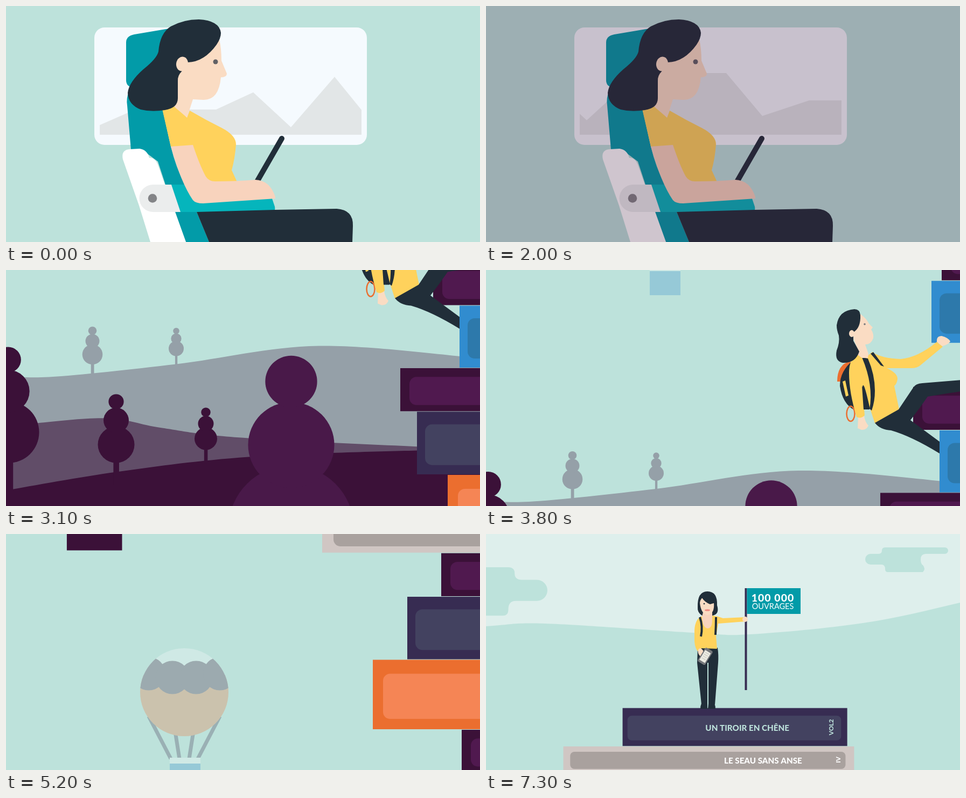
These frames come from a looping animation (880 px wide and 440 px high, 8000 ms). An HTML page with a canvas:

```html
<!DOCTYPE html>
<html lang="fr">
<head>
<meta charset="utf-8">
<style>
html, body { margin: 0; width: 100%; height: 100%; overflow: hidden; background: #bde2db; }
canvas { display: block; }
</style>
</head>
<body>
<canvas id="stage" width="880" height="440"></canvas>
<script>
const g = document.getElementById('stage').getContext('2d');
const LOOP = 8000, CLIMB = 2400, END = 7300;
const MINT = '#bde2db', PALE = '#deefec', NAVY = '#212e39', TEAL = '#029ba8', YELLOW = '#ffd25c',
  SKIN = '#fadcc3', ARM = '#f8d3bd', PLUM = '#3b1138', ORANGE = '#eb6e2f', GREY = '#95a0a8',
  INDIGO = '#372c52', WHITE = '#fff';

/* ---------- helpers ---------- */
function shape(color, d) { g.fillStyle = color; g.fill(new Path2D(d)); }
function line(color, width, d) {
  g.strokeStyle = color; g.lineWidth = width; g.stroke(new Path2D(d));
}
function rect(color, x, y, w, h, r = 0) {
  g.fillStyle = color; g.beginPath(); g.roundRect(x, y, w, h, r); g.fill();
}
function oval(color, x, y, rx, ry = rx, turn = 0) {
  g.fillStyle = color; g.beginPath(); g.ellipse(x, y, rx, ry, turn, 0, 7); g.fill();
}
function ring(color, width, x, y, rx, ry) {
  g.strokeStyle = color; g.lineWidth = width;
  g.beginPath(); g.ellipse(x, y, rx, ry, 0, 0, 7); g.stroke();
}
function text(s, x, y, size, color, weight = 800) {
  g.font = `${weight} ${size}px Lato, "Open Sans", sans-serif`;
  g.textAlign = 'center'; g.fillStyle = color; g.fillText(s, x, y);
}
function upright(s, x, y, size, color) {
  g.save(); g.translate(x, y); g.rotate(-Math.PI / 2);
  text(s, 0, size * .36, size, color); g.restore();
}
// smooth curve through a few points, filled to the given depth
function hill(color, depth, ...pts) {
  const last = pts.length - 1, at = i => pts[Math.max(0, Math.min(last, i))];
  g.beginPath(); g.moveTo(...pts[0]);
  for (let i = 0; i < last; i++) {
    const [a, b, c, d] = [at(i - 1), at(i), at(i + 1), at(i + 2)];
    g.bezierCurveTo(b[0] + (c[0] - a[0]) / 6, b[1] + (c[1] - a[1]) / 6,
      c[0] - (d[0] - b[0]) / 6, c[1] - (d[1] - b[1]) / 6, ...c);
  }
  g.lineTo(pts[last][0], depth); g.lineTo(pts[0][0], depth);
  g.fillStyle = color; g.fill();
}

/* ---------- train ---------- */
const RIDGE = 'M174,240V222L240,193H390L459,161L529,226L610,132L686,226L760,133L847,213L921,145'
  + 'L1057,125H1106L1173,205L1260,176H1500V240Z';

function train(t) {
  rect(MINT, 0, 0, 880, 440);
  rect('#f5fafe', 164, 40, 506, 219, 19);
  g.save();
  g.beginPath(); g.rect(174, 50, 486, 190); g.clip();
  g.translate(-.33 * t, 0);
  shape('#e2e6e7', RIDGE);
  g.restore();

  // seat
  shape(TEAL, 'M223,68Q223,56 238,53L303,42L320,150L235,152Q223,150 223,138Z');
  shape(TEAL, 'M228,160Q223,172 225,185L232,268L262,275L282,290L296,333L314,384L334,440H377L354,384L332,333Q315,300 306,262L290,190Z');
  shape(WHITE, 'M217,286Q213,268 230,267L248,266Q262,268 266,283Q277,283 282,296L295,333L314,384L334,440H268L247,372Z');
  shape('#05b5bc', 'M307,333H360L400,360L494,359L499,374Q501,384 494,384H324Z');
  shape('#ebeded', 'M273,333H307L324,384H273A25,25 0 0 1 273,333Z');
  oval('#838487', 272, 358.5, 8.3);

  // traveller
  shape(NAVY, 'M354,384L499,380L614,378Q645,380 644,410L643,440H377Z');
  shape(YELLOW, 'M290,192L310,182L336,208L341,195Q370,212 400,227Q427,241 427,258Q425,285 419,306L429,328H370L345,262H306Z');
  shape(SKIN, 'M396,62Q400,80 400,102L410,126Q410,133 399,133Q395,176 366,175L347,174L336,208L308,184L318,130L325,110L340,98Z');
  shape(NAVY, 'M283,85Q286,50 306,38Q330,25 358,25Q396,27 399,50Q399,60 391,72Q368,104 338,105L327,121Q318,130 319,140V172Q319,190 295,194Q270,198 250,193Q227,184 226,162Q228,142 255,118Q280,98 283,85Z');
  oval(SKIN, 327, 108, 11, 13.5, .15);
  oval('#616165', 389, 104, 4.5);
  g.lineCap = 'round';
  line(NAVY, 10, 'M512,247L465,329');
  g.lineCap = 'butt';
  shape(ARM, 'M306,262L347,259Q360,298 371,318Q377,327 388,327Q430,327 463,324Q490,325 500,356V359L366,368Q352,368 347,362Q325,330 306,262Z');
}

/* ---------- camera ---------- */
const stop = (t, k, x, y) => ({ t, k, x, y });
const VALLEY = stop(CLIMB, 1, 0, -891), LEDGE = stop(3800, 1, 0, -426), ZOOM = stop(5550, 1, 0, 106.5),
  STACK = stop(6250, .715, -111, 555), SUMMIT = stop(END, .608, -245, 885);
const PATH = [VALLEY, LEDGE, ZOOM, STACK, SUMMIT];
const WORLD = stop(0, 1, 0, 0);

function view(t) {
  const i = PATH.findIndex(s => t <= s.t) || 1, a = PATH[i - 1], b = PATH[i];
  const p = (t - a.t) / (b.t - a.t), mix = key => a[key] + (b[key] - a[key]) * p;
  return stop(t, mix('k'), mix('x'), mix('y'));
}
// use the screen coordinates that hold while the camera is at `spot`
function place(cam, spot) {
  const k = cam.k / spot.k;
  g.setTransform(k, 0, 0, k, cam.x - k * spot.x, cam.y - k * spot.y);
}

/* ---------- landscape ---------- */
// three stacked balls on a trunk; (x, y) is the centre of the lowest
function tree(color, x, y, r) {
  rect(color, x - .15 * r, y, .31 * r, 2.2 * r);
  oval(color, x, y, r);
  oval(color, x, y - 1.33 * r, .69 * r);
  oval(color, x, y - 2.35 * r, .415 * r);
}

function valley(cam) {
  place(cam, LEDGE);
  hill(GREY, 1000, [-20, 427], [80, 432], [316, 408], [580, 374], [880, 397]);
  tree(GREY, 160.5, 390, 18.8);
  tree(GREY, 316, 379, 14);
  place(cam, VALLEY);
  hill('#614d68', 500, [-20, 64], [58, 53], [190, 44], [290, 62], [450, 81], [880, 102]);
  hill(PLUM, 1000, [-20, 182], [205, 144], [450, 116], [763, 104], [900, 104]);
  tree(PLUM, 4, 70, 57.5);
  tree(PLUM, 204.5, 93, 34);
  tree(PLUM, 371, 82, 21);
  tree('#491949', 529.5, 248, 116);
}

// flip = -1 mirrors the cloud around its left tip
function cloud(color, x, y, s, flip = 1) {
  g.save(); g.translate(x, y); g.scale(s * flip, s);
  shape(color, 'M37,0H148A6,6 0 0 1 148,12H113Q103,12 103,22Q103,31 107,33Q113,40 107,46H42Q37,46 37,40Q37,32 30,32H10A10,10 0 0 1 10,12H24Q31,12 31,6Q31,0 37,0Z');
  g.restore();
}

function heavens(cam) {
  place(cam, SUMMIT);
  hill(PALE, -500, [-200, 187], [0, 172], [110, 167], [385, 184], [490, 187], [700, 166], [880, 128], [1060, 80]);
  cloud(MINT, 114, 62, 1.96, -1);
  cloud(MINT, 704, 25, 1);
  place(cam, STACK);
  cloud('#edf6f5', -278, 75, 2.17);
  cloud('#edf6f5', 133, 335, 1.526);
}

function balloon(x, y, s, c) {
  g.save(); g.translate(x, y); g.scale(s, s);
  for (const side of [-1, 1])
    line(c.rope, 7, `M${66 * side},45L${25 * side},124M${16.5 * side},76L${9 * side},124`);
  rect(c.rim, -27, 122, 57, 11);
  rect(c.basket, -27, 133, 57, 45);
  g.beginPath(); g.arc(0, 0, 82, 0, 7); g.clip();
  rect(c.top, -82, -82, 164, 52);
  rect(c.low, -82, -32, 164, 114);
  if (c.cap) oval(c.cap, 0, -82, 62, 23);
  for (let i = -3; i <= 3; i += 2) oval(c.band, 22 * i, -24 - 3.5 * Math.abs(i), 31);
  g.restore();
}
const FAINT = { rope: '#9ab0b4', rim: '#cfe9e5', basket: '#96c9d7', top: '#cfe9e5', band: '#9caaaf', low: '#cbc2ad' };
const BRIGHT = { rope: ORANGE, rim: WHITE, basket: PLUM, top: WHITE, band: WHITE, low: PLUM, cap: ORANGE };

/* ---------- books ---------- */
const cover = (body, label, ink, h, gutter, size, w = 686) => ({ body, label, ink, h, gutter, size, w });
const plum = cover(PLUM, '#50194f', MINT, 81.2, 17, 21.5),
  navy = cover(INDIGO, '#434260', MINT, 117.6, 15, 25),
  blue = cover('#318ccf', '#2d79ab', MINT, 116.5, 15, 27.5),
  orange = cover(ORANGE, '#f58555', WHITE, 81, 12.5, 21.5, 676),
  atlas = cover(ORANGE, '#f58555', WHITE, 130.5, 19, 25),
  grey = cover('#d0c6c3', '#a9a19e', WHITE, 82, 21, 25, 888);

// top to bottom: cover, left edge, title and its centre
const SHELF = [
  [navy, 820, 'UN TIROIR EN CHÊNE', 1201],
  [grey, 639, 'LE SEAU SANS ANSE', 1249],
  [plum, 814, 'LE GRAVIER', 1271],
  [orange, 720, 'LA TUILE GIVRÉE', 1147],
  [blue, 801, 'OÙ DORT LE SEL ?', 1243],
  [plum, 680, 'LA SACOCHE', 1134],
  [navy, 884, 'CEUX QUI TAMISENT', 1263],
  [orange, 1007, 'UN TIROIR EN CHÊNE', 1394],
  [navy, 738], [grey, 587], [plum, 808], [navy, 745], [atlas, 681], [plum, 846], [blue, 827],
  [plum, 900], [plum, 793], [blue, 842], [plum, 732], [navy, 763], [atlas, 820], [plum, 900], [blue, 852]
];

function books(cam) {
  place(cam, WORLD);
  let y = -922;
  SHELF.forEach(([c, x, title, mid], i) => {
    rect(c.body, x, y, c.w, c.h - 1);
    rect(c.label, x + c.gutter, y + .2 * c.h, c.w - 2.25 * c.gutter, .645 * c.h, 13);
    if (title) {
      text(title, mid, y + c.h / 2 + .45 * c.size, c.size, c.ink);
      upright(i ? 'IV' : 'VOL2', x + c.w - 49, y + c.h / 2, 19, c === grey ? WHITE : MINT);
    }
    y += c.h;
  });
}

/* ---------- climber ---------- */
function reaching(cam) {
  place(cam, LEDGE);
  shape(ORANGE, 'M652,208Q652,176 676,170L680,178L660,208Z');
  shape(NAVY, 'M682,168Q657,188 657,216Q662,250 684,261L722,258L712,170Z');
  shape(YELLOW, 'M662,208L667,206L673,234L668,236Z');
  ring(ORANGE, 2.5, 677, 268, 7.5, 14);
  shape(SKIN, 'M691,274L702,272Q704,284 710,290Q706,299 697,298L690,295Z');
  shape(YELLOW, 'M690,157L705,163L717,153Q735,165 770,166Q802,163 837,134L848,143L806,178Q800,183 790,183H744Q764,192 764,203Q763,212 758,216L767,260L722,286L712,255Q700,200 699,220L703,271Q696,278 688,274Q674,228 674,192Q674,165 690,157Z');
  shape(NAVY, 'M698,163L709,165Q722,195 722,225Q722,245 716,262L711,258Q706,235 698,216L701,260H712Q720,215 698,163Z');
  shape(NAVY, 'M714,156L719,153L739,180L733,178Z');
  shape(NAVY, 'M722,285L766,260L794,218Q798,212 810,211L930,201V219Q855,230 820,236Q805,258 788,280Q815,300 842,320V342Q790,310 752,299Q732,298 722,285Z');
  shape(SKIN, 'M695,82Q706,90 711,100L718,107L715,111Q720,118 719,127Q715,139 704,139L710,156L709,164H698L690,158L692,152L682,128L683,110Z');
  shape(NAVY, 'M695,84Q694,73 684,73Q655,75 651,103Q651,112 655,122Q657,135 651,150Q647,170 662,173Q686,174 693,152L682,132V116Q696,108 695,84Z');
  oval(SKIN, 679, 118.5, 5, 6.5);
  oval('#77777b', 703, 101, 1.8);
  shape(SKIN, 'M837,134Q836,123 846,123Q858,126 862,133Q860,138 847,142Z');
}

function crouching(cam) {
  place(cam, STACK);
  ring(ORANGE, 2, 347, 364, 10, 5);
  shape(ORANGE, 'M378,333Q392,327 405,333L408,339L385,342Z');
  shape(NAVY, 'M353,374Q358,350 380,339Q395,333 410,337L372,372L357,382Z');
  shape(YELLOW, 'M365,351L381,340L383,342L368,353Z');
  shape(NAVY, 'M342,409L366,413L405,416Q418,425 420,440H337Z');
  shape(SKIN, 'M354,414L365,416V429Q358,435 353,428Z');
  shape(YELLOW, 'M420,338Q392,342 367,368L352,384L341,409L352,416L365,418L372,402H413Q416,396 417,385Q425,405 437,414L468,435L479,430L443,408Q432,390 431,362Z');
  shape(NAVY, 'M418,339L424,342Q385,352 364,384L358,380Q376,348 418,339ZM425,358L430,362Q428,372 414,390V383Z');
  line('#e6b94f', 4, 'M381,370L367,410');
  shape(SKIN, 'M447,332L466,344V352Q460,363 445,361L434,353L420,359L418,340Z');
  shape(NAVY, 'M413,330Q412,317 430,317Q446,322 457,316Q476,315 481,335Q478,346 464,345L450,334Q442,345 425,345Q415,341 413,330Z');
  oval(SKIN, 450, 335, 4, 3.2);
  oval('#616165', 462, 351, 1);
  shape(SKIN, 'M468,431Q474,425 480,430V440H469Z');
}

function standing(cam) {
  place(cam, SUMMIT);
  rect(INDIGO, 480.5, 101, 4, 190);
  rect(TEAL, 484.5, 101, 99.5, 48);
  g.letterSpacing = '1px';
  text('100 000', 532.5, 126, 19.5, WHITE);
  g.letterSpacing = '0px';
  text('OUVRAGES', 532.5, 140, 14.5, WHITE, 400);

  shape(NAVY, 'M393,212H430Q432,225 431,240L425,318H413V240H411V318H400L392,240Z');
  shape(NAVY, 'M400,316H411V326H398Q398,320 400,316ZM413,316H424Q426,320 426,326H412Z');
  shape(YELLOW, 'M402,153Q388,157 387,180V200Q388,215 395,220L400,213L429,214L427,190L431,167L482,163V155L440,157Q430,153 421,152Z');
  shape(NAVY, 'M393,137Q392,107 411,107Q430,107 429,133Q434,149 421,152H401Q392,146 393,137Z');
  shape(ARM, 'M403,146H420V160Q420,176 411,176Q402,174 401,154Z');
  line(NAVY, 4, 'M397,155Q403,172 399,191M427,155Q427,170 426,188');
  shape(SKIN, 'M397,128Q399,116 409,118L423,128Q425,149 411,151Q399,149 397,128Z');
  shape(NAVY, 'M396,128Q397,111 412,110L426,128L416,131Q406,127 401,119Q398,122 396,128Z');
  oval(NAVY, 405, 130, 1.3);
  oval('#ee8a80', 411, 142, 5, 1.8);
  oval(SKIN, 481, 159, 5);
  oval(SKIN, 399, 221, 5, 8, -.3);
  g.save(); g.translate(407, 228); g.rotate(.55);
  rect('#75777b', -8, -15, 16, 30, 3);
  rect('#ecebe3', -6, -10, 12, 21);
  for (let y = -7; y < 9; y += 4) rect('#c4c4bd', -4, y, 8, 1);
  g.restore();
}

function climb(t) {
  const cam = view(t);
  rect(MINT, 0, 0, 880, 440);
  heavens(cam);
  valley(cam);
  place(cam, WORLD);
  balloon(331, 295, 1, FAINT);
  balloon(161.5, -290, 1.8, BRIGHT);
  books(cam);
  reaching(cam);
  crouching(cam);
  standing(cam);
}

/* ---------- timing ---------- */
// the picture advances in held steps
function hold(t) {
  if (t < 2000) return t - t % 200;
  if (t < CLIMB) return t - t % 100;
  return Math.min(END, t - (t - CLIMB) % 350);
}

function draw(now) {
  const t = hold(now % LOOP);
  g.resetTransform();
  if (t >= CLIMB) return climb(t);
  train(t);
  g.globalAlpha = t < 2000 ? 0 : (t - 1900) / 410;
  rect(PLUM, 0, 0, 880, 440);
  g.globalAlpha = 1;
}

const start = performance.now();
function tick() {
  draw(performance.now() - start);
  requestAnimationFrame(tick);
}
tick();
</script>
</body>
</html>
```
